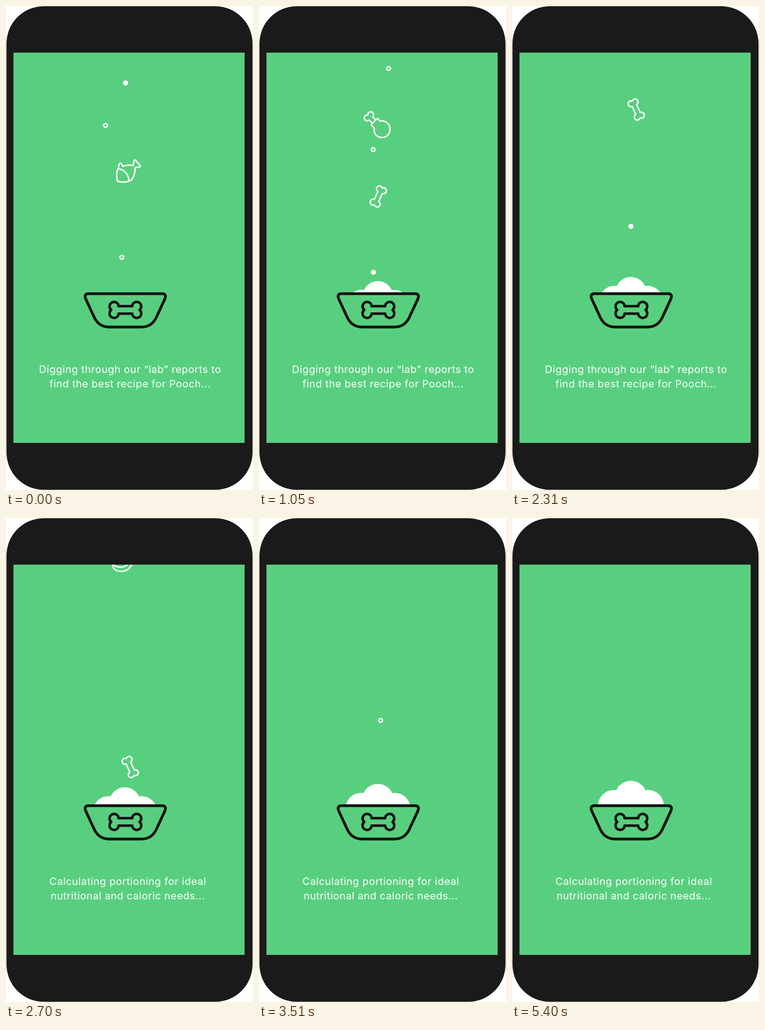
Animation, 530 px wide and 1038 px high, one loop 5.76 s. Source, as an HTML page:

```html
<!DOCTYPE html>
<html lang="en">
<head>
<meta charset="utf-8">
<title>Filling the bowl</title>
<style>
html, body { margin: 0; width: 100%; height: 100%; overflow: hidden; background: #fff; }
svg { display: block; width: 100vw; height: 100vh; }
text { font: 400 22px Inter, "Open Sans", sans-serif; letter-spacing: .55px; fill: #fff; text-anchor: middle; }
.line { fill: none; stroke: #fff; stroke-width: 3; stroke-linecap: round; stroke-linejoin: round; }
.solid { fill: #fff; stroke: none; }
.dark { fill: #58cf7f; stroke: #151515; stroke-width: 6; stroke-linejoin: round; }
</style>
</head>
<body>
<svg viewBox="0 0 530 1038">
  <defs>
    <clipPath id="air"><rect x="16" y="100" width="496" height="517"/></clipPath>
    <path id="boneShape" d="M-14.6-8H14.6A9.7 9.7 0 1 1 30.5 0A9.7 9.7 0 1 1 14.6 8H-14.6A9.7 9.7 0 1 1-30.5 0A9.7 9.7 0 1 1-14.6-8Z"/>
    <g id="dot"><circle r="5.5" class="solid"/></g>
    <g id="ring"><circle r="4"/></g>
    <g id="boneR" stroke-width="4.6"><use href="#boneShape" transform="rotate(-65) scale(.65)"/></g>
    <g id="boneL" stroke-width="4.6"><use href="#boneShape" transform="rotate(65) scale(.65)"/></g>
    <g id="fish">
      <path d="M-22.5 22C-26 10-25 0-20.5-6C-21-12-18-20-14.5-16L-11.5-10C-4-13 4-13.5 11-12L13-22.5Q14-25 16-23L26-11.5Q27-9 25-8.5L15-7.5C15 8 10 20 1 22C-7 24-15 24-22.5 22Z"/>
      <path d="M-21-5C-10-4 1 6 2 21"/>
    </g>
    <g id="drumstick">
      <path d="M-12.5 0L-1-12Q1-13 2.5-11L5.5-7C14-10 26-3 27 8C28 20 20 28 10 28C-2 28-9 18-6.5 8L-12 3Q-14 1.5-12.5 0Z"/>
      <path d="M-4-10L-10-16.5A6.2 6.2 0 1 0-20.5-20A6.2 6.2 0 1 0-17.5-9.5L-11-3"/>
    </g>
    <g id="apple">
      <path d="M4-11C-4-17-16-17-21-8C-27 3-22 18-16 22C-12 25-9 22-6 22C-3 22-2 28 4 28C13 28 23 13 23 1C23-10 14-14 4-11Z"/>
      <path d="M5-11Q8-17 4-22"/>
      <path class="solid" d="M12-16C9-25 18-31 28-29C30-19 21-12 12-16Z"/>
    </g>
    <g id="steak">
      <path d="M-25 1C-23-14-9-23 11-23.5C25-23 28-12 18-4C10 1 8 14-7 14.5C-20 14.5-26 9-25 1Z"/>
      <path d="M-25 1V9C-25 18-18 23-7 23.5C8 23.5 11 15 16 9C21 4 27 0 25-13"/>
      <path d="M-14 1L-3-16M-7 5L6-13M-16-6L0 1M-9-11L8-5"/>
    </g>
  </defs>
  <rect x="1" y=".5" width="528" height="1037" rx="80" fill="#1a1a1a"/>
  <rect x="16" y="100" width="496" height="837" fill="#58cf7f"/>
  <g clip-path="url(#air)">
    <g id="items" class="line"></g>
    <g id="pile" class="solid">
      <circle cx="-36.5" cy="53.5" r="33.8"/>
      <circle cy="34.5" r="34.5"/>
      <circle cx="37" cy="53.5" r="33.8"/>
    </g>
  </g>
  <path class="dark" d="M176 617H336Q345 618 341 628L322 669Q312 688.5 291 688.5H221Q200 688.5 190 669L171 628Q167 618 176 617Z"/>
  <use href="#boneShape" class="dark" style="stroke-width:5.5" x="256.2" y="651.8"/>
  <g id="first">
    <text x="266.3" y="787">Digging through our “lab” reports to</text>
    <text x="266.3" y="818">find the best recipe for Pooch...</text>
  </g>
  <g id="second">
    <text x="261.3" y="787">Calculating portioning for ideal</text>
    <text x="261.3" y="818">nutritional and caloric needs...</text>
  </g>
</svg>
<script>
const LOOP = 5760, STEP = 30;
const $ = id => document.getElementById(id);

// shape, x, y at time, time, pixels per ms
const drops = [
  ["dot", 256.5, 165, 0, .62],
  ["ring", 213.5, 256, 0, .62],
  ["fish", 262, 354, 0, .8],
  ["ring", 248.5, 539, 0, .62],
  ["ring", 278, 134, 1050, .64],
  ["drumstick", 254, 254, 1050, .8],
  ["ring", 245, 308, 1050, .64],
  ["boneR", 256, 408.5, 1050, .8],
  ["dot", 245.5, 571, 1050, .64],
  ["apple", 271, 250, 1800, .8],
  ["dot", 266, 437, 1800, .66],
  ["dot", 248, 543, 1800, .66],
  ["boneL", 266.5, 222, 2310, .8],
  ["dot", 255, 472.5, 2310, .78],
  ["ring", 261, 159.5, 3060, .61],
  ["steak", 254, 379, 3060, .8],
  ["dot", 268, 197, 4110, .575]
].map(([shape, x, y, at, speed]) => {
  const el = document.createElementNS("http://www.w3.org/2000/svg", "use");
  el.setAttribute("href", "#" + shape);
  $("items").append(el);
  return { el, x, y, at, speed };
});

// time, how far the pile sits below its full height
const sink = [[0, 55], [525, 37.7], [1050, 26.5], [1800, 18.5], [2310, 17.5], [3060, 10.5], [4110, 1.5], [4770, 0], [LOOP, 0]];

const clamp = v => Math.min(1, Math.max(0, v));
const fade = (t, from, to) => clamp((t - from) / (to - from));

function level(t) {
  const i = sink.findIndex(p => p[0] > t);
  const [t0, a] = sink[i - 1], [t1, b] = sink[i];
  return a + (b - a) * fade(t, t0, t1);
}

function draw(t) {
  for (const d of drops) {
    const y = d.y + d.speed * (t - d.at);
    const seen = y > 60 && y < 650;
    d.el.setAttribute("visibility", seen ? "visible" : "hidden");
    if (seen) d.el.setAttribute("transform", `translate(${d.x} ${y})`);
  }
  const low = level(t);
  $("pile").setAttribute("transform", `translate(255 ${563.5 + low}) scale(${1 - low / 500})`);
  $("first").setAttribute("opacity", 1 - fade(t, 2310, 2400));
  $("second").setAttribute("opacity", fade(t, 2400, 2580));
}

const start = performance.now();
function tick() {
  const t = (performance.now() - start) % LOOP;
  draw(Math.floor(t / STEP) * STEP);
  requestAnimationFrame(tick);
}
draw(0);
requestAnimationFrame(tick);
</script>
</body>
</html>
```
